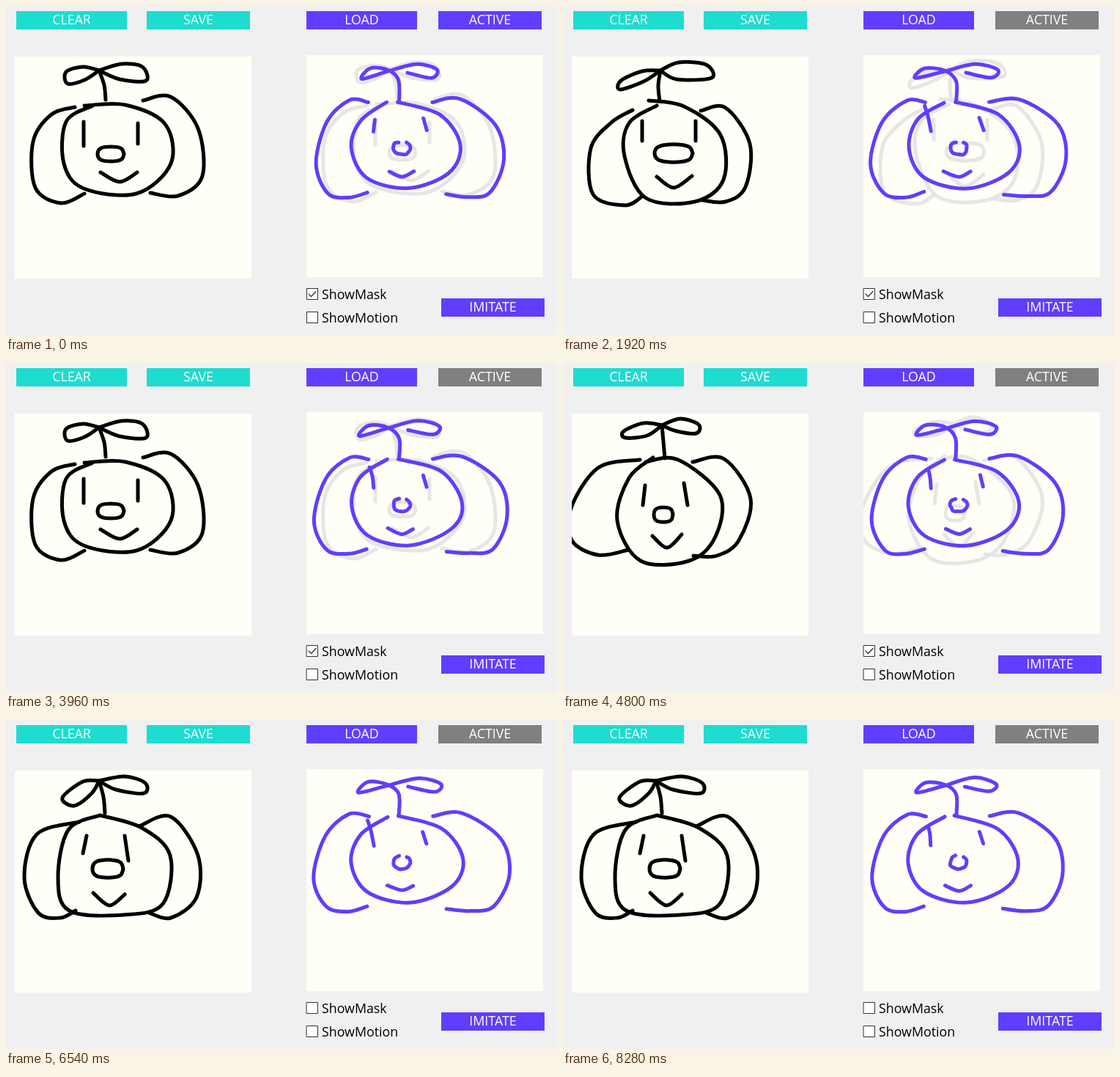
Recreate the animation shown at these times as an HTML page with a canvas. Size 752 px wide and 449 px high, loop 8340 ms.

```html
<!DOCTYPE html>
<html lang="en">
<head>
<meta charset="utf-8">
<title>Sketch imitation</title>
<style>
html, body { margin: 0; width: 100%; height: 100%; overflow: hidden; background: #f0f0f0; }
canvas { display: block; }
</style>
</head>
<body>
<canvas id="stage" width="752" height="449"></canvas>
<script>
const ctx = document.getElementById('stage').getContext('2d');
const LOOP = 8340, STEP = 60, START = 420, HOLD = 180;
const TEAL = '#1edccf', VIOLET = '#613dff', PAPER = '#fffff7';

const pairs = flat => flat.flatMap((x, i) => i % 2 ? [] : [[x, flat[i + 1]]]);

// Slightly squared ring, clockwise between two angles given in turns
function ring([cx, cy, rx, ry], from = 0, to = 1, power = .75) {
  const bend = v => Math.sign(v) * Math.abs(v) ** power;
  return Array.from({ length: 11 }, (_, i) => {
    const a = (from + (to - from) * i / 10) * 2 * Math.PI;
    return [cx + rx * bend(Math.cos(a)), cy + ry * bend(Math.sin(a))];
  });
}

function face(tip, leafL, leafR, root, earL, earR, head, eyes, nose, mouth) {
  const [a, b] = [pairs(eyes).slice(0, 2), pairs(eyes).slice(2)];
  const stem = [tip, [root[0] - 2, (tip[1] + root[1]) / 2], root];
  const leaves = [leafL, leafR].map(leaf => [tip, ...pairs(leaf), tip]);
  return [...leaves, stem, a, b, ring(nose), ...[earL, earR, head, mouth].map(pairs)];
}

const calm = face([127, 88],
  [105, 83, 82, 90, 84, 106, 107, 101], [158, 79, 186, 83, 191, 102, 155, 100], [136, 128],
  [94, 138, 62, 148, 37, 185, 40, 248, 75, 269, 107, 256],
  [187, 129, 225, 124, 262, 167, 268, 232, 235, 259, 197, 255],
  [107, 136, 163, 135, 217, 161, 225, 215, 178, 256, 106, 249, 79, 215, 82, 158, 118, 136],
  [106, 158, 106, 191, 180, 160, 180, 188], [143, 202, 18, 10], [129, 227, 155, 240, 179, 227]);
const left = face([128, 83],
  [105, 78, 76, 89, 78, 102, 110, 97], [150, 76, 182, 83, 183, 98, 155, 91], [127, 120],
  [89, 128, 38, 134, 12, 190, 13, 250, 46, 270, 74, 251],
  [190, 127, 238, 135, 261, 180, 255, 240, 215, 261, 181, 254],
  [107, 128, 155, 124, 207, 147, 208, 220, 165, 251, 82, 251, 57, 195, 73, 152, 113, 132],
  [94, 159, 92, 175, 168, 154, 168, 183], [132, 191, 19, 11], [116, 223, 137, 235, 156, 225]);
const low = face([133, 88],
  [108, 89, 79, 102, 78, 114, 110, 103], [158, 77, 195, 80, 203, 98, 155, 100], [132, 130],
  [95, 142, 66, 159, 38, 194, 41, 257, 85, 272, 109, 259],
  [188, 143, 222, 139, 255, 188, 249, 247, 222, 267, 190, 265],
  [117, 129, 165, 137, 215, 176, 219, 237, 180, 267, 113, 262, 84, 205, 90, 160, 128, 136],
  [108, 157, 108, 184, 181, 157, 181, 184], [151, 201, 26, 12], [128, 233, 151, 248, 176, 232]);
const wide = face([127, 83],
  [105, 84, 77, 106, 93, 117, 117, 100], [162, 77, 190, 86, 188, 100, 150, 95], [135, 127],
  [100, 139, 42, 156, 25, 215, 44, 263, 74, 270, 95, 260],
  [182, 145, 225, 132, 262, 185, 260, 242, 225, 270, 195, 263],
  [128, 130, 185, 147, 224, 185, 214, 251, 160, 266, 86, 260, 71, 215, 85, 150, 128, 130],
  [110, 158, 105, 182, 162, 158, 167, 192], [139, 203, 21, 12], [119, 236, 141, 253, 162, 238]);
const tall = face([135, 85],
  [110, 82, 83, 93, 85, 102, 115, 99], [160, 76, 185, 84, 182, 96, 155, 93], [139, 130],
  [105, 132, 48, 143, 11, 198, 12, 242, 48, 262, 89, 255],
  [177, 135, 220, 131, 256, 185, 240, 242, 210, 263, 178, 263],
  [113, 135, 157, 132, 214, 180, 208, 237, 172, 270, 106, 270, 74, 215, 90, 157, 123, 129],
  [112, 167, 109, 194, 165, 164, 170, 194], [137, 207, 13, 10], [122, 236, 142, 252, 162, 234]);
const cycle = [wide, low, calm, tall, left, calm, low];

// Imitated strokes: pivot x, horizontal stretch, points
const imitation = [
  [530, .09, pairs([536, 130, 536, 102, 522, 88, 497, 85, 485, 99, 520, 90, 560, 79, 588, 87, 580, 98, 548, 91])],
  [495, .045, pairs([495, 132, 470, 129, 438, 158, 423, 215, 440, 255, 468, 261, 493, 254])],
  [582, .08, pairs([582, 131, 620, 127, 668, 162, 679, 210, 660, 254, 630, 260, 600, 257])],
  [490, .025, pairs([520, 132, 484, 156, 472, 195, 493, 235, 550, 249, 605, 227, 620, 190, 592, 148, 534, 131])],
  [575, .1, pairs([569, 153, 574, 169])],
  [540, 0, ring([540, 194, 11.5, 9], .7, -.16, .9)],
  [555, .1, pairs([523, 226, 541, 233, 556, 226])]
];

function drawCurve(points) {
  const at = i => points[Math.max(0, Math.min(points.length - 1, i))];
  ctx.beginPath();
  ctx.moveTo(...points[0]);
  for (let i = 0; i < points.length - 1; i++) {
    const [a, b, c, d] = [at(i - 1), at(i), at(i + 1), at(i + 2)];
    ctx.bezierCurveTo(b[0] + (c[0] - a[0]) / 6, b[1] + (c[1] - a[1]) / 6,
      c[0] - (d[0] - b[0]) / 6, c[1] - (d[1] - b[1]) / 6, c[0], c[1]);
  }
  ctx.stroke();
}

function drawPanel(x, y, draw) {
  ctx.save();
  ctx.beginPath();
  ctx.rect(x, y, 323, 303);
  ctx.fillStyle = PAPER;
  ctx.fill();
  ctx.clip();
  draw();
  ctx.restore();
}

function drawSketch(pose, color, dx = 0, dy = 0) {
  ctx.save();
  ctx.translate(dx, dy);
  ctx.strokeStyle = color;
  pose.forEach(drawCurve);
  ctx.restore();
}

function drawImitation(tick, spread) {
  let n = 0;
  const noise = () => {
    const v = Math.sin(++n * 12.99 + tick * 78.23) * 43758.55;
    return (v - Math.floor(v) - .5) * 1.6;
  };
  const shake = ([x, y]) => [x + noise(), y + noise()];
  ctx.strokeStyle = VIOLET;
  for (const [pivot, stretch, points] of imitation)
    drawCurve(points.map(([x, y]) => shake([x + (x - pivot) * stretch * spread, y])));
  const eye = [[503 - 9 * spread, 156 - 19 * spread], [503 - 4 * spread, 160 - 8 * spread], [502, 171]];
  drawCurve(eye.map(shake));
}

function drawButton(label, x, y, width, color) {
  ctx.fillStyle = color;
  ctx.fillRect(x, y, width, 25);
  ctx.fillStyle = '#fff';
  ctx.textAlign = 'center';
  ctx.fillText(label, x + width / 2, y + 18);
}

function drawCheckbox(label, y, checked) {
  ctx.fillStyle = '#fff';
  ctx.fillRect(410, y, 16, 16);
  ctx.lineWidth = 1;
  ctx.strokeStyle = '#333';
  ctx.strokeRect(410.5, y + .5, 15, 15);
  if (checked) {
    ctx.lineWidth = 1.4;
    ctx.beginPath();
    ctx.moveTo(413, y + 8);
    ctx.lineTo(416.5, y + 11.5);
    ctx.lineTo(423, y + 4.5);
    ctx.stroke();
  }
  ctx.fillStyle = '#000';
  ctx.textAlign = 'left';
  ctx.fillText(label, 431, y + 15);
}

function render(now) {
  const tick = Math.floor(now % LOOP / STEP), t = tick * STEP;
  const active = t >= START;
  const turn = Math.min(28, Math.floor((t - START) / HOLD));
  const pose = active ? cycle[turn % cycle.length] : calm;
  const spread = active ? .5 + .5 * Math.cos((t - 1920) / 330 * 2 * Math.PI) : 0;
  const masked = t < 5100 || (t >= 5700 && t < 6420);

  ctx.fillStyle = '#f0f0f0';
  ctx.fillRect(0, 0, 752, 449);
  ctx.font = '17.8px "Open Sans", "Noto Sans", sans-serif';
  drawButton('CLEAR', 14, 7, 151, TEAL);
  drawButton('SAVE', 192, 7, 141, TEAL);
  drawButton('LOAD', 410, 7, 151, VIOLET);
  drawButton('ACTIVE', 590, 7, 141, active ? '#808080' : VIOLET);
  drawButton('IMITATE', 594, 399, 141, VIOLET);
  drawCheckbox('ShowMask', 385, masked);
  drawCheckbox('ShowMotion', 417, false);

  ctx.lineWidth = 5;
  ctx.lineCap = ctx.lineJoin = 'round';
  drawPanel(12, 69, () => drawSketch(pose, '#000'));
  drawPanel(410, 67, () => {
    if (masked) drawSketch(pose, '#e6e6e6', 398, -2);
    drawImitation(tick, spread);
  });
}

let begin;
function loop(now) {
  begin ??= now;
  render(now - begin);
  requestAnimationFrame(loop);
}
requestAnimationFrame(loop);
</script>
</body>
</html>
```
